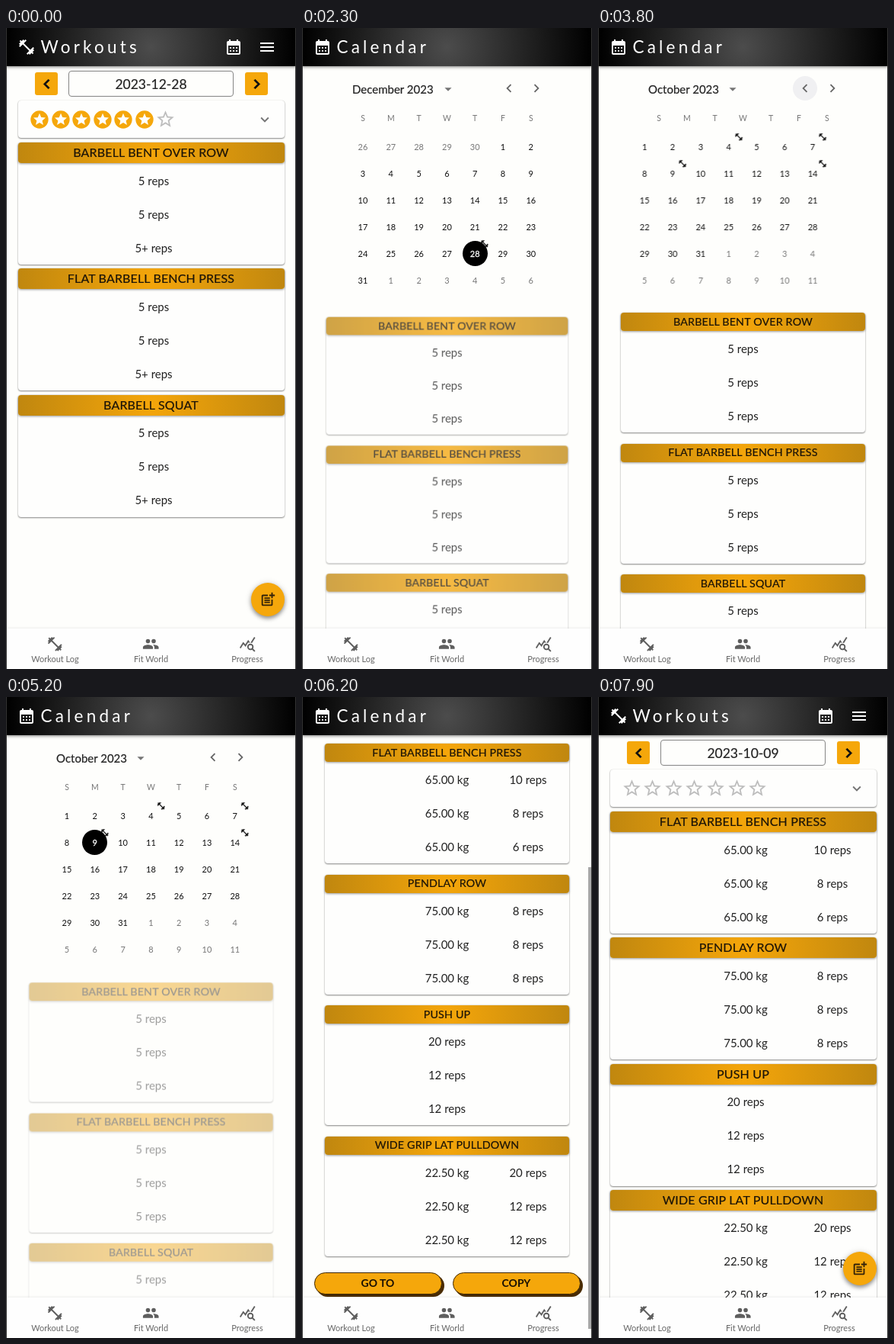
Animation, 381 px wide and 840 px high, one loop 8 s. Source, as an HTML page:

```html
<!DOCTYPE html>
<html lang="en">
<head>
<meta charset="utf-8">
<title>Workouts</title>
<style>
html, body { margin: 0; width: 100%; height: 100%; overflow: hidden; background: #fefefc; }
#stage { position: relative; width: 381px; height: 840px; overflow: hidden; background: #fefefc; font: 15px/1 Lato, sans-serif; color: #222; }
#stage div, #stage span, #stage svg { position: absolute; box-sizing: border-box; }
#stage span { transform: translate(-50%, -50%); white-space: nowrap; }
#stage span.left { transform: translate(0, -50%); }
.page { inset: 0; background: #fefefc; }
.bar { left: 0; top: 0; width: 381px; height: 50px; background: radial-gradient(circle, #4c4c4c, #000 190px); box-shadow: 0 1px 4px #0008; color: #fff; }
.bar .title { font-size: 22.5px; letter-spacing: 4.2px; }
.card { border-radius: 4px; background: #fefefd; box-shadow: 0 1px 2px #0007, 0 0 1px #0003; }
.head { left: 0; top: 0; width: 100%; border-radius: 4px; background: radial-gradient(circle, #f5a60a, #c0870f); box-shadow: 0 1px 3px #0006; color: #1c1408; }
.head span, .medium { -webkit-text-stroke: .2px; }
.head span { letter-spacing: .15px; }
.gold { background: #f5a70b; }
.date { left: 82px; top: 56px; width: 217px; height: 34px; border: 1px solid #858585; border-radius: 4px; }
.fab { left: 322px; top: 727px; width: 44px; height: 44px; border-radius: 50%; box-shadow: 0 3px 5px #0005, 0 1px 8px #0003; }
.view { left: 0; top: 50px; width: 381px; height: 737px; overflow: hidden; }
.scroll { left: 0; top: -50px; width: 381px; height: 1152px; }
.month { left: 30px; top: 136px; width: 320px; height: 214px; overflow: hidden; }
.grid { inset: 0; font-size: 11px; color: #111; }
.dim { color: #777; }
.sel { width: 33px; height: 33px; margin: -16.5px; border-radius: 50%; background: #000; color: #fff; -webkit-text-stroke: .3px; }
.list { left: 30px; top: 373px; width: 321px; opacity: 0; }
.pill { width: 168px; height: 29px; border: 1.5px solid #3b2503; border-radius: 15px; box-shadow: 3px 3px 0 #4a2c02; color: #1a1003; font-weight: 700; font-size: 14px; }
.nav { left: 0; top: 787px; width: 381px; height: 53px; background: #fefefe; box-shadow: 0 -1px 3px #0001; color: #666; font-size: 11px; }
.thumb { left: 376px; top: 0; width: 4px; height: 605px; background: #a9a9a9; opacity: 0; }
.edge { inset: 0; border: solid #333; border-width: 0 1px; }
</style>
</head>
<body>
<div id="stage"></div>
<script>
const LOOP = 8000;
const STANDARD = 'cubic-bezier(.4,0,.2,1)';
const SLIDE = 'cubic-bezier(.35,.8,.4,1)';

const paths = {
  dumbbell: 'M20.57 14.86 22 13.43 20.57 12 17 15.57 8.43 7 12 3.43 10.57 2 9.14 3.43 7.71 2 5.57 4.14 4.14 2.71 2.71 4.14l1.43 1.43L2 7.71l1.43 1.43L2 10.57 3.43 12 7 8.43 15.57 17 12 20.57 13.43 22l1.43-1.43L16.29 22l2.14-2.14 1.43 1.43 1.43-1.43-1.43-1.43L22 16.29z',
  calendar: 'M19 4h-1V2h-2v2H8V2H6v2H5c-1.1 0-2 .9-2 2v14c0 1.1.9 2 2 2h14c1.1 0 2-.9 2-2V6c0-1.1-.9-2-2-2zm0 16H5V10h14v10zM9 14H7v-2h2v2zm4 0h-2v-2h2v2zm4 0h-2v-2h2v2zm-8 4H7v-2h2v2zm4 0h-2v-2h2v2zm4 0h-2v-2h2v2z',
  menu: 'M3 18h18v-2H3zm0-5h18v-2H3zm0-7v2h18V6z',
  prev: 'M15.41 7.41 14 6l-6 6 6 6 1.41-1.41L10.83 12z',
  next: 'M10 6 8.59 7.41 13.17 12l-4.58 4.59L10 18l6-6z',
  more: 'M16.59 8.59 12 13.17 7.41 8.59 6 10l6 6 6-6z',
  drop: 'M7 10l5 5 5-5z',
  star: 'M12 2a10 10 0 1 0 0 20 10 10 0 1 0 0-20zm4.23 16L12 15.45 7.77 18l1.12-4.81-3.73-3.23 4.92-.42L12 5l1.92 4.53 4.92.42-3.73 3.23z',
  outline: 'M22 9.24l-7.19-.62L12 2 9.19 8.63 2 9.24l5.46 4.73L5.82 21 12 17.27 18.18 21l-1.63-7.03zM12 15.4l-3.76 2.27 1-4.28-3.32-2.88 4.38-.38L12 6.1l1.71 4.04 4.38.38-3.32 2.88 1 4.28z',
  add: 'M17 19H5V7h7V5H5c-1.1 0-2 .9-2 2v12c0 1.1.9 2 2 2h12c1.1 0 2-.9 2-2v-7h-2zM19 2h-2v3h-3v2h3v3h2V7h3V5h-3zM7 9h8v2H7zM7 12v2h8v-2zm0 3h8v2H7z',
  people: 'M16 11a3 3 0 1 0 0-6 3 3 0 1 0 0 6zm-8 0a3 3 0 1 0 0-6 3 3 0 1 0 0 6zm0 2c-2.33 0-7 1.17-7 3.5V19h14v-2.5c0-2.33-4.67-3.5-7-3.5zm8 0c-.29 0-.62.02-.97.05 1.16.84 1.97 1.97 1.97 3.45V19h6v-2.5c0-2.33-4.67-3.5-7-3.5z',
  stats: 'M19.88 18.47c.44-.7.7-1.51.7-2.39a4.5 4.5 0 1 0-4.5 4.5c.88 0 1.7-.26 2.39-.7L21.58 23 23 21.58zm-3.8.11a2.5 2.5 0 1 1 0-5 2.5 2.5 0 1 1 0 5zm-.36-8.5c-.74.02-1.45.18-2.1.45l-.55-.83-3.8 6.18-3.01-3.52-3.63 5.81L1 17l5-8 3 3.5L13 6zm2.59.5c-.64-.28-1.33-.45-2.05-.49L21.38 2 23 3.18z'
};

const icon = (name, x, y, size, color, bold = 0) =>
  `<svg viewBox="0 0 24 24" width="${size}" height="${size}" style="left:${x - size / 2}px;top:${y - size / 2}px" fill="${color}" stroke="${color}" stroke-width="${bold}"><path d="${paths[name]}"/></svg>`;
const text = (x, y, s, cls = '', size = '') =>
  `<span class="${cls}" style="left:${x}px;top:${y - .5}px;${size && `font-size:${size}px`}">${s}</span>`;
const box = (cls, html = '', style = '', id = '') =>
  `<div class="${cls}" ${id && `id="${id}"`} style="${style}">${html}</div>`;
const rect = (x, y, w, h) => `left:${x}px;top:${y}px;width:${w}px;height:${h}px`;

// Each exercise: name, weight in kg (or 0), reps per set
const planned = last => ['BARBELL BENT OVER ROW', 'FLAT BARBELL BENCH PRESS', 'BARBELL SQUAT']
  .map(name => [name, 0, ['5', '5', last]]);
const logged = [
  ['FLAT BARBELL BENCH PRESS', 65, [10, 8, 6]],
  ['PENDLAY ROW', 75, [8, 8, 8]],
  ['PUSH UP', 0, [20, 12, 12]],
  ['WIDE GRIP LAT PULLDOWN', 22.5, [20, 12, 12]]
];

const big = { w: 350, h: 160, pitch: 165.3, head: 27, font: 16, row: 50, mid: 178.5, reps: 292.5 };
const small = { w: 321, h: 157, pitch: 171.6, head: 24, font: 14.3, row: 47.5, mid: 160.5, reps: 267 };

const cards = (items, k, x, y) => items.map(([name, kg, sets], i) => box('card',
  box('head', text(k.w / 2, k.head / 2, name, '', k.font), `height:${k.head}px`) +
  sets.map((n, j) => {
    const cy = k.row + 44 * j;
    return kg ? text(k.mid, cy, kg.toFixed(2) + ' kg') + text(k.reps, cy, n + ' reps') : text(k.mid, cy, n + ' reps');
  }).join(''), rect(x, y + i * k.pitch, k.w, k.h))).join('');

const bar = (title, name, extra = '') =>
  box('bar', icon(name, 27, 25, 24, '#fff') + text(45.5, 25.5, title, 'left title') + extra);

const workouts = (id, date, stars, items) => box('page',
  box('gold', icon('prev', 15, 15, 25, '#111', .8), rect(38, 58, 29.5, 29.5) + ';border-radius:3px') +
  box('gold', icon('next', 15, 15, 25, '#111', .8), rect(314, 58, 29.5, 29.5) + ';border-radius:3px') +
  box('date') + text(190.5, 74, date, 'medium', 17.5) +
  box('card', [...Array(7).keys()].map(i => i < stars
    ? icon('star', 28.5 + 27.6 * i, 24.5, 28, '#f5a70b')
    : icon('outline', 28.5 + 27.6 * i, 24.5, 27, '#bdbdbd')).join('') +
    icon('more', 324, 25, 22, '#757575'), rect(15.5, 95, 350, 49)) +
  cards(items, big, 15.5, 150) +
  box('fab gold', icon('add', 22, 22, 22, '#33230a')) +
  bar('Workouts', 'dumbbell', icon('calendar', 299, 25, 24, '#fff') + icon('menu', 343, 25, 24, '#fff')), '', id);

// Six full weeks beginning on Sunday
const grid = (id, month, marked, chosen, selId) => {
  const start = 1 - new Date(2023, month, 1).getDay();
  let html = '', marks = '';
  for (let i = 0; i < 42; i++) {
    const d = new Date(2023, month, start + i), n = d.getDate(), inside = d.getMonth() === month;
    const x = 50 + 36.8 * (i % 7), y = 19 + 35 * Math.floor(i / 7);
    html += text(x, y, n, inside ? '' : 'dim');
    if (inside && n === chosen) html += box('sel', text(16.5, 16.5, n), `left:${x}px;top:${y}px`, selId);
    if (inside && marked.includes(n)) marks += icon('dumbbell', x + 13, y - 12, 11.5, '#111', .6);
  }
  return box('grid', html + marks, '', id);
};

const label = (id, name, x) => box('', text(66, 80, name + ' 2023', 'left medium') + icon('drop', x, 79.5, 22, '#757575'), '', id);
const pill = (x, s) => box('pill gold', text(82.5, 13.5, s), `left:${x}px;top:693px`);

const calendar = box('page', box('view', box('scroll',
  label('dec', 'December', 192) + label('nov', 'November', 193) + label('oct', 'October', 177) +
  box('', '', rect(256, 63, 32, 32) + ';border-radius:50%;background:#f0f0f2', 'ripple') +
  icon('prev', 271.5, 79, 22, '#666') + icon('next', 308, 79, 22, '#666') +
  [...'SMTWTFS'].map((s, i) => text(80 + 36.8 * i, 118.5, s, 'dim', 10.5)).join('') +
  box('month', grid('gridDec', 11, [28], 28, 'sel28') + grid('gridNov', 10, []) + grid('gridOct', 9, [4, 7, 9, 14], 9, 'sel9')) +
  box('list', cards(planned('5'), small, 0, 0), 'height:594px', 'listDec') +
  box('list', cards(logged, small, 0, 0) + pill(-14, 'GO TO') + pill(168, 'COPY'), 'height:766px', 'listOct'), '', 'scroll')) +
  bar('Calendar', 'calendar'), '', 'calendar');

const tab = (x, name, s) => icon(name, x, 20.5, 22.5, '#5e5e5e') + text(x, 39.5, s);

document.getElementById('stage').innerHTML =
  workouts('before', '2023-12-28', 6, planned('5+')) +
  calendar + workouts('after', '2023-10-09', 0, logged) +
  box('nav', tab(64.5, 'dumbbell', 'Workout Log') + tab(190.5, 'people', 'Fit World') + tab(317, 'stats', 'Progress')) +
  box('thumb', '', '', 'thumb') + box('edge');

// Steps are [time, value, easing to the next step]; the ends are held
const anim = (id, prop, steps) => {
  const all = [...steps], first = all[0], last = all[all.length - 1];
  if (first[0] > 0) all.unshift([0, first[1]]);
  if (last[0] < LOOP) all.push([LOOP, last[1]]);
  document.getElementById(id).animate(
    all.map(([t, v, easing = 'linear']) => ({ offset: t / LOOP, [prop]: v, easing })),
    { duration: LOOP, iterations: Infinity });
};
const show = (id, from, to) => anim(id, 'opacity', [
  ...(from > 0 ? [[from, 0]] : []), [from, 1],
  [to, 1], ...(to < LOOP ? [[to, 0]] : [])
]);

const OPEN = 1760, NOV = 3170, OCT = 3576, PICK = 5060, BACK = 7260;
show('before', 0, OPEN);
show('calendar', OPEN, BACK);
show('after', BACK, LOOP);
show('dec', 0, NOV);
show('nov', NOV, OCT);
show('oct', OCT, LOOP);

const AT = x => `translateX(${x}px)`;
const enter = t => [[t, AT(-320), SLIDE], [t + 375, AT(0)]];
const leave = t => [[t, AT(0), SLIDE], [t + 375, AT(320)]];
anim('gridDec', 'transform', leave(NOV));
anim('gridNov', 'transform', [...enter(NOV), ...leave(OCT)]);
anim('gridOct', 'transform', enter(OCT));
anim('sel9', 'opacity', [[PICK, 0], [PICK + 100, 1]]);
anim('ripple', 'opacity', [[NOV - 40, 0], [NOV + 60, 1], [3850, 1], [4000, 0]]);

// Lists grow in and out; the scale runs for two thirds of the fade
const SMALL = 'scale(.75,.5625)', FULL = 'scale(1,1)';
const growIn = (t, d) => [
  [[t, 0, STANDARD], [t + d, 1]],
  [[t, SMALL, STANDARD], [t + d * .666, FULL]]
];
const [fadeDec, scaleDec] = growIn(2116, 375);
anim('listDec', 'opacity', [...fadeDec, [PICK, 1, STANDARD], [PICK + 375, 0]]);
anim('listDec', 'transform', [...scaleDec, [PICK + 125, FULL, STANDARD], [PICK + 375, SMALL]]);
const [fadeOct, scaleOct] = growIn(5447, 404);
anim('listOct', 'opacity', fadeOct);
anim('listOct', 'transform', scaleOct);

const FLICK = 'cubic-bezier(.25,.5,.4,1)';
anim('scroll', 'transform', [[5950, 'translateY(0px)', FLICK], [6200, 'translateY(-312px)']]);
anim('thumb', 'transform', [[5950, 'translateY(0px)', FLICK], [6200, 'translateY(223px)']]);
anim('thumb', 'opacity', [[5950, 0], [5950, 1], [6480, 1], [6850, 0]]);
</script>
</body>
</html>
```
